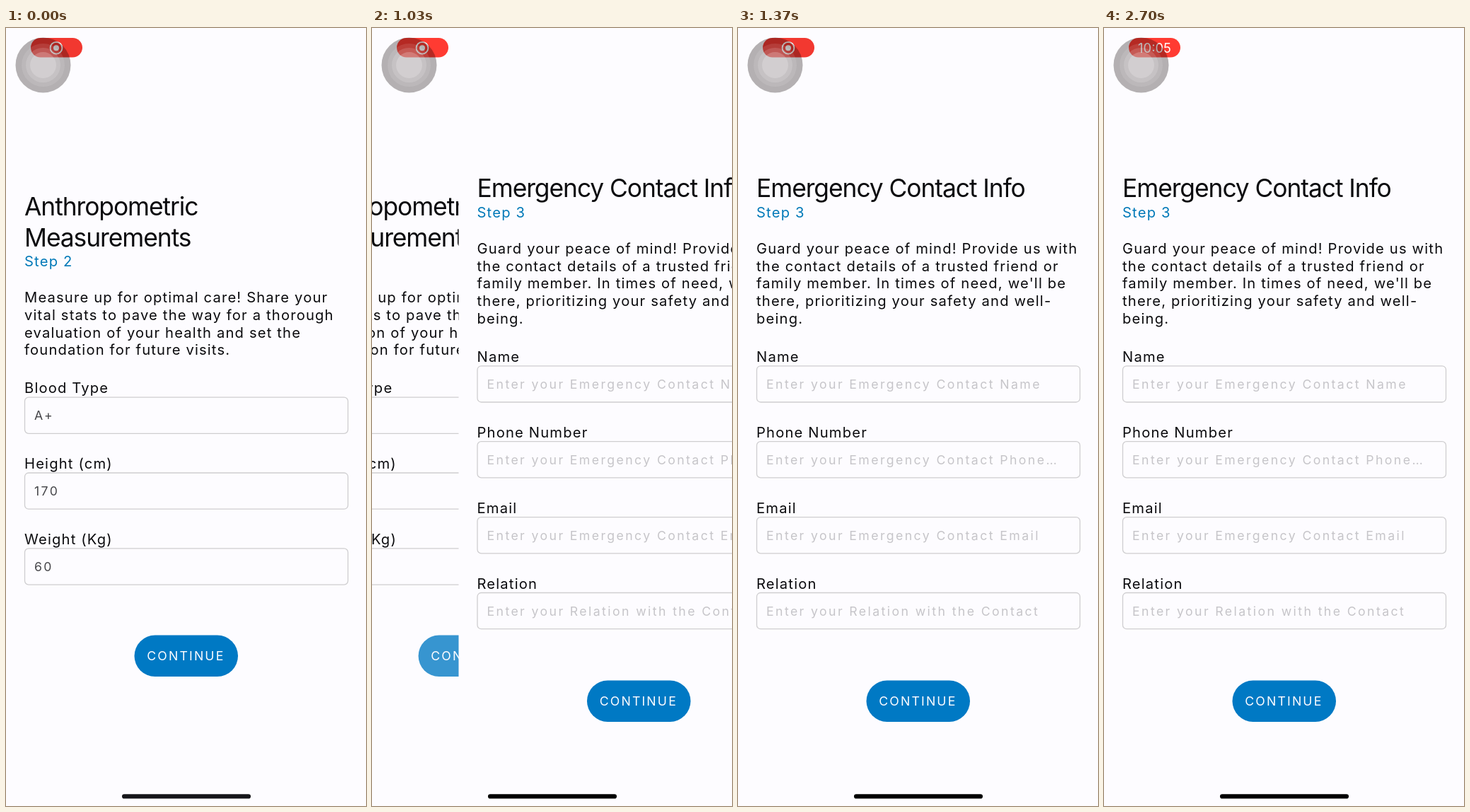
Write an HTML page that moves like this. It is 509 px wide and 1100 px high and loops after 2.73 s.

```html
<!DOCTYPE html>
<html lang="en">
<head>
<meta charset="utf-8">
<title>Sign-up steps</title>
<style>
  html, body { margin: 0; width: 100%; height: 100%; overflow: hidden; background: #fdfcff; }
  svg { display: block; width: 100%; height: 100%; }
  text { font-family: Inter, Roboto, sans-serif; font-optical-sizing: none; fill: #0b0b0e; white-space: pre; }
  .title { font-size: 35.4px; letter-spacing: -1.07px; }
  .body, .step { font-size: 20.2px; letter-spacing: 1.17px; }
  .step { fill: #0079b8; }
  .value, .hint, .action { font-size: 17.7px; letter-spacing: 2.4px; }
  .value { fill: #47474b; }
  .hint { fill: #c6c5c9; }
  .action { fill: #fdfcff; letter-spacing: 2.15px; }
  .box { fill: none; stroke: #cfced0; stroke-width: 1.3; }
  .clock { font-size: 18.4px; fill: #fff; text-anchor: middle; }
</style>
</head>
<body>
<svg viewBox="0 0 509 1100" preserveAspectRatio="none">
  <g id="old"></g>
  <g id="next"></g>
  <rect id="pill" x="35" y="14" width="73" height="27.5" rx="13.75"/>
  <g id="rec" fill="#fff">
    <circle cx="71" cy="28.2" r="8.4" fill="none" stroke="#fff" stroke-width="1.8"/>
    <circle cx="71" cy="28.2" r="4"/>
  </g>
  <text id="clock" class="clock" x="71.5" y="34.8">10:05</text>
  <g id="touch">
    <circle cx="52.5" cy="52.5" r="39" fill="#0a0203" fill-opacity=".3"/>
    <circle cx="52.5" cy="52.5" r="30.5" fill="#fff" fill-opacity=".1"/>
    <circle cx="52.5" cy="52.5" r="24.5" fill="#fff" fill-opacity=".14"/>
    <circle cx="52.5" cy="52.5" r="18.5" fill="#fff" fill-opacity=".2"/>
  </g>
  <rect id="home" x="164" y="1083.3" width="182" height="6.2" rx="3.1"/>
</svg>
<script>
const W = 509, H = 1100, LOOP = 2730, FRAME = 100 / 3;
const $ = id => document.getElementById(id);

function add(parent, tag, attrs, text) {
  const el = document.createElementNS('http://www.w3.org/2000/svg', tag);
  for (const k in attrs) el.setAttribute(k, attrs[k]);
  if (text) el.textContent = text;
  parent.appendChild(el);
  return el;
}

// Builds one form page and returns its button group.
function page(root, p) {
  const write = (cls, x, y, s) => add(root, 'text', { class: cls, x, y }, s);
  add(root, 'rect', { width: W, height: H, fill: '#fdfcff' });
  p.title.forEach((s, i) => write('title', 26, p.titleY + i * 44, s));
  write('step', 26, p.stepY, p.step);
  p.body.forEach((s, i) => write('body', 26, p.stepY + 51.2 + i * 24.8, s));
  p.fields.forEach(([label, s], i) => {
    const y = p.fieldY + i * 106.9;
    write('body', 26, y - 5.6, label);
    add(root, 'rect', { class: 'box', x: 26.5, y: y + .3, width: 457, height: 51.2, rx: 5.5 });
    write(p.kind, 40, y + 32.4, s);
  });
  const g = add(root, 'g', {});
  add(g, 'rect', { x: 181.5, y: p.buttonY, width: 146.5, height: 58.4, rx: 29.2, fill: '#0079c4' });
  add(g, 'text', { class: 'action', x: 199.2, y: p.buttonY + 35.4 }, 'CONTINUE');
  return g;
}

const button = page($('old'), {
  title: ['Anthropometric', 'Measurements'], titleY: 264.5,
  step: 'Step 2', stepY: 336.8,
  body: ['Measure up for optimal care! Share your',
    'vital stats to pave the way for a thorough',
    'evaluation of your health and set the',
    'foundation for future visits.'],
  fields: [['Blood Type', 'A+'], ['Height (cm)', '170'], ['Weight (Kg)', '60']],
  kind: 'value', fieldY: 521.8, buttonY: 858.6
});

page($('next'), {
  title: ['Emergency Contact Info'], titleY: 238.7,
  step: 'Step 3', stepY: 267.6,
  body: ['Guard your peace of mind! Provide us with',
    'the contact details of a trusted friend or',
    "family member. In times of need, we'll be",
    'there, prioritizing your safety and well-',
    'being.'],
  fields: [['Name', 'Enter your Emergency Contact Name'],
    ['Phone Number', 'Enter your Emergency Contact Phone…'],
    ['Email', 'Enter your Emergency Contact Email'],
    ['Relation', 'Enter your Relation with the Contact']],
  kind: 'hint', fieldY: 477.5, buttonY: 922.5
});

const clamp = v => Math.min(1, Math.max(0, v));
const span = (t, from, ms) => clamp((t - from) / ms);
const inOut = x => x < .5 ? 2 * x * x : 1 - 2 * (1 - x) * (1 - x);

// Critically damped spring used for the page push.
function push(t) {
  const x = Math.max(0, t - 883) / 1000 * Math.sqrt(1000 / 3);
  return x > 8 ? 1 : 1 - (1 + x) * Math.exp(-x);
}

// Brightness of the recording pill: [ms, level]
const glow = [[0, .95], [400, .98], [700, 1], [1170, 1], [1370, .95], [1830, .83], [2250, .92], [2550, 1], [2730, 1]];
function level(t) {
  const i = Math.max(1, glow.findIndex(k => k[0] >= t));
  const [a, u] = glow[i - 1], [b, v] = glow[i];
  return u + (v - u) * span(t, a, b - a);
}

function draw(ms) {
  const t = Math.floor((ms % LOOP + 4) / FRAME) * FRAME;
  const p = push(t);
  $('old').setAttribute('transform', `translate(${-.3 * W * p} 0)`);
  $('next').setAttribute('transform', `translate(${W * (1 - p)} 0)`);
  $('next').style.display = p > 0 ? '' : 'none';
  button.setAttribute('opacity', 1 - .8 * inOut(span(t, 650, 150)) + .8 * inOut(span(t, 876, 250)));

  const l = level(Math.min(t, LOOP));
  $('pill').setAttribute('fill', `rgb(${255 * l},${59 * l},${50 * l})`);
  $('rec').setAttribute('opacity', 1 - span(t, 2250, 170));
  $('clock').setAttribute('opacity', span(t, 2400, 200));
  const dark = 22 * (1 - span(t, 0, 300));
  $('home').setAttribute('fill', `rgb(${dark},${dark},${dark * 1.2})`);
}

const start = performance.now();
function tick() {
  draw(performance.now() - start);
  requestAnimationFrame(tick);
}
draw(0);
tick();
</script>
</body>
</html>
```
